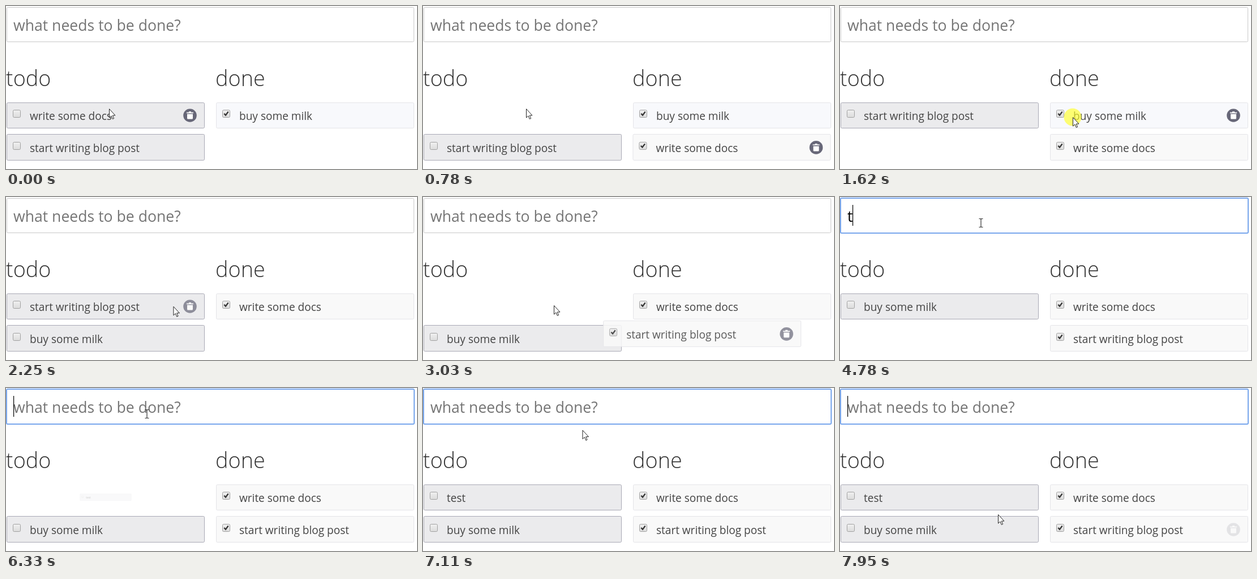
Write an HTML page that moves like this. It is 726 by 289 pixels and loops after 8 s.

```html
<!DOCTYPE html>
<html lang="en">
<head>
<meta charset="utf-8">
<title>Todo list</title>
<style>
  html, body { margin: 0; width: 100%; height: 100%; overflow: hidden; background: #fff; }
  svg { display: block; }
  text { font-family: "Open Sans", "Noto Sans", sans-serif; white-space: pre; }
  .heading { font-size: 37.8px; font-weight: 300; fill: #333; }
  .item text { font-size: 19.05px; fill: #444; }
  .field { font-size: 26.6px; }
</style>
</head>
<body>
<svg id="stage" width="726" height="289" viewBox="0 0 726 289">
  <defs>
    <linearGradient id="box" x2="0" y2="1">
      <stop stop-color="#f0f0f0"/><stop offset="1" stop-color="#dcdcdc"/>
    </linearGradient>
  </defs>
  <rect id="frame" fill="#fff"/>
  <text id="field" class="field" x="13" y="44"></text>
  <rect id="caret" y="14" width="1.2" height="37" fill="#000"/>
  <text class="heading" x="0" y="142">todo</text>
  <text class="heading" x="370" y="142">done</text>
  <g id="list"></g>
  <circle id="glow" r="15.5" fill="#ffff28" fill-opacity=".65"/>
  <path id="arrow" d="M.5 .5V16L4 12.8 6.3 18.4 8.6 17.4 6.3 12H11Z" fill="#fff" stroke="#222"/>
  <path id="beam" d="M-3.5 -7.5H-1L0 -6.5 1 -7.5H3.5M0 -6.5V6.5M-3.5 7.5H-1L0 6.5 1 7.5H3.5" fill="none" stroke="#333" stroke-width="1.2"/>
</svg>
<script>
const LOOP = 8000, FLY = 273, GROW = 600, FADE = 200;
const ROW1 = 170, ROW2 = 227, SHIFT = 370;
const MOVE1 = 582, MOVE2 = 1733, MOVE3 = 2943, ADD = 6296, FOCUS = 4230;
const END1 = MOVE1 + FLY, END2 = MOVE2 + FLY, END3 = MOVE3 + FLY;
const $ = id => document.getElementById(id);
const clamp = v => Math.min(1, Math.max(0, v));
const quintOut = v => 1 - (1 - clamp(v)) ** 5;

// rows: [time, y]; hover: [from, to]; enter / leave: start and offset of the flight
const items = [
  { text: 'write some docs', rows: [[0, ROW1]], leave: [MOVE1, SHIFT, 57], hover: [[-999, LOOP]] },
  { text: 'start writing blog post', rows: [[0, ROW2], [END1, ROW1]], leave: [MOVE3, SHIFT, 57],
    hover: [[870, 1270], [2110, LOOP]] },
  { text: 'buy some milk', rows: [[0, ROW2], [END3, ROW1], [ADD, ROW2]], enter: [MOVE2, SHIFT, -57],
    hover: [[0, 2020], [END3, 3335]] },
  { text: 'test', rows: [[0, ROW1]], grow: ADD, hover: [] },
  { text: 'buy some milk', done: true, fill: '#f8f9fc', rows: [[0, ROW1]], leave: [MOVE2, -SHIFT, 57],
    hover: [[1330, LOOP]] },
  { text: 'write some docs', done: true, rows: [[0, ROW2], [END2, ROW1]], enter: [MOVE1, -SHIFT, -57],
    hover: [[0, 880], [END2, 2060], [7380, 7480]] },
  { text: 'start writing blog post', done: true, rows: [[0, ROW2]], enter: [MOVE3, -SHIFT, -57],
    hover: [[0, 2990], [7500, 7780]] }
];

const path = [
  [0, 182, 182], [880, 182, 182], [1150, 300, 190], [1440, 411, 197], [1960, 411, 197],
  [2320, 268, 193], [2700, 231, 192], [3230, 231, 192], [3600, 236, 115], [3750, 236, 115],
  [4150, 249, 46], [7040, 249, 46], [7250, 345, 130], [7450, 430, 205], [7600, 430, 276],
  [7720, 400, 240], [7780, 371, 224], [7880, 279, 224], [LOOP, 279, 224]
];
const clicks = [[420, 600], [1600, 1740], [2760, 2910], [FOCUS, 4420]];
const typing = [[4780, 't'], [5280, 'te'], [5460, 'tes'], [5660, 'test'], [ADD, '']];
const caretOff = [[0, FOCUS], [6190, ADD], [6800, 7300]];

const within = (spans, t) => spans.some(([a, b]) => t >= a && t < b);
const latest = (steps, t, start) => steps.reduce((v, [at, next]) => t >= at ? next : v, start);

function buildItem(item) {
  const g = document.createElementNS('http://www.w3.org/2000/svg', 'g');
  const fill = item.fill || (item.done ? '#f9f9f9' : '#ebebed');
  g.setAttribute('class', 'item');
  g.innerHTML = `
    <rect class="card" x=".5" width="349" rx="2" fill="${fill}" stroke="${item.done ? '#e4e4e8' : '#a9a9b5'}"/>
    <rect x="11.5" y="14.5" width="13" height="13" rx="2" fill="url(#box)" stroke="#a0a0a0"/>
    ${item.done ? '<path d="M14.3 20.8L17 23.6 21.6 17.4" fill="none" stroke="#333" stroke-width="2.3"/>' : ''}
    <text x="41" y="32">${item.text}</text>
    <g class="bin" transform="translate(324 24)">
      <circle r="11.8" fill="#676778"/>
      <path d="M-6 -5.5H-2V-7H2V-5.5H6V-3.8H-6ZM-5 -2.5H5V5Q5 6.5 3.5 6.5H-3.5Q-5 6.5 -5 5Z" fill="#fff"/>
    </g>`;
  $('list').append(g);
  item.node = g;
  item.card = g.querySelector('.card');
  item.bin = g.querySelector('.bin');
}

// The eased hover state of an item: fades in over FADE, then out again
function hoverLevel(spans, t) {
  const levels = spans.map(([a, b]) => {
    const peak = clamp((b - a) / FADE);
    return Math.min(peak, clamp((t - a) / FADE), clamp(peak - (t - b) / FADE));
  });
  return Math.max(0, ...levels);
}

function drawItem(item, t) {
  const { enter, leave, grow } = item;
  const start = enter ? enter[0] : grow || 0;
  const shown = t >= start && !(leave && t >= leave[0] + FLY);
  item.node.style.display = shown ? '' : 'none';
  if (!shown) return;

  const row = latest(item.rows, t, 0);
  // The upper row is one pixel shorter
  const inset = row === ROW1 ? 1 : 0;
  item.card.setAttribute('y', .5 + inset);
  item.card.setAttribute('height', 46 - inset);

  let x = item.done ? 371 : 1, y = row, alpha = 1, scale = '';
  if (enter) {
    alpha = quintOut((t - start) / FLY);
    x += enter[1] * (1 - alpha);
    y += enter[2] * (1 - alpha);
  }
  if (leave) {
    const k = quintOut((t - leave[0]) / FLY);
    alpha *= 1 - k;
    x += leave[1] * k;
    y += leave[2] * k;
  }
  if (grow) {
    alpha = quintOut((t - grow) / GROW);
    scale = ` translate(175 23.5) scale(${alpha}) translate(-175 -23.5)`;
  }
  item.node.setAttribute('transform', `translate(${x} ${y})${scale}`);
  item.node.setAttribute('opacity', alpha);
  item.bin.setAttribute('opacity', hoverLevel(item.hover, t));
}

function drawInput(t) {
  const focus = t >= FOCUS;
  const value = latest(typing, t, '');
  const shape = focus
    ? { x: 1, y: 2, width: 720, height: 62, rx: 2, stroke: '#78a6ec', 'stroke-width': 2 }
    : { x: 1.5, y: 2.5, width: 719, height: 61, rx: 2, stroke: '#c8c8c8', 'stroke-width': 1 };
  for (const key in shape) $('frame').setAttribute(key, shape[key]);
  $('field').textContent = value || 'what needs to be done?';
  $('field').setAttribute('fill', value ? '#000' : '#757575');
  const width = value ? $('field').getComputedTextLength() : 0;
  $('caret').setAttribute('x', 13 + Math.floor(width));
  $('caret').style.display = within(caretOff, t) ? 'none' : '';
}

function drawPointer(t) {
  const i = path.findIndex(p => p[0] > t);
  const [a, ax, ay] = path[i - 1], [b, bx, by] = path[i];
  const k = (t - a) / (b - a);
  const x = ax + (bx - ax) * k, y = ay + (by - ay) * k;
  const overInput = y < 64;
  for (const id of ['glow', 'arrow', 'beam']) $(id).setAttribute('transform', `translate(${x} ${y})`);
  $('glow').style.display = within(clicks, t) ? '' : 'none';
  $('arrow').style.display = overInput ? 'none' : '';
  $('beam').style.display = overInput ? '' : 'none';
}

function render(t) {
  items.forEach(item => drawItem(item, t));
  drawInput(t);
  drawPointer(t);
}

items.forEach(buildItem);
const begin = performance.now();
function tick() {
  render((performance.now() - begin) % LOOP);
  requestAnimationFrame(tick);
}
tick();
</script>
</body>
</html>
```
